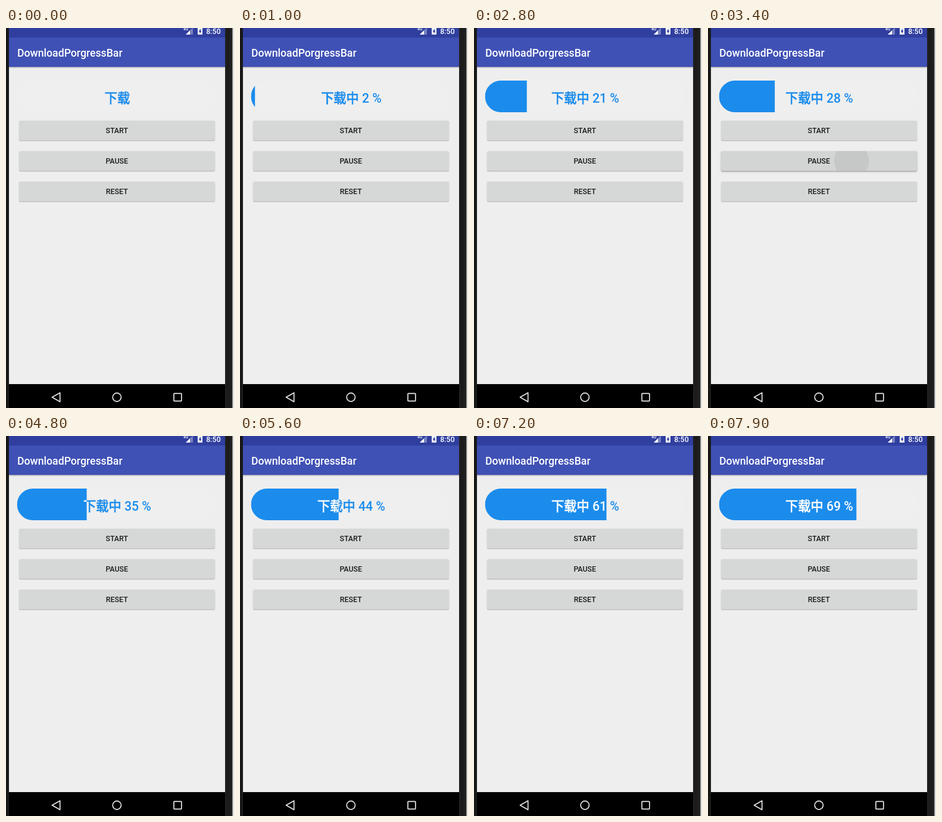
Recreate the animation shown at these times as an HTML page. Size 383 px wide and 636 px high, loop 8000 ms.

```html
<!DOCTYPE html>
<html lang="zh">
<head>
<meta charset="utf-8">
<style>
  html, body { margin: 0; width: 100%; height: 100%; overflow: hidden; background: #1c1c1c; }
  #stage { position: relative; width: 383px; height: 636px; overflow: hidden;
           font: 500 12.4px Roboto, "Noto Sans CJK SC", "Noto Sans CJK", sans-serif; }
  #stage > * { position: absolute; }
  .bezel { inset: 0; background: linear-gradient(90deg, #171717 0 3px, #222 5px, #222 368px, #1a1a1a 372px, #202020 379px, #303030 380px, #888 380px 381px, #ddd 381px); }
  .screen { left: 5px; top: 0; width: 363px; height: 636px; background: #eee; }
  .toolbar { left: 5px; top: 0; width: 363px; height: 65px; box-sizing: border-box;
             border-top: 16px solid #303f9f; background: #3f51b5; box-shadow: 0 1px 2px rgba(0,0,0,.4);
             clip-path: inset(0 0 -5px 0); }
  .nav { left: 5px; top: 596px; width: 363px; height: 40px; background: #000; }
  .button { left: 22px; width: 328.5px; height: 32.5px; border-radius: 2px; background: #d6d7d7;
            box-shadow: 0 1px 1.5px rgba(0,0,0,.27); color: #1c1c1c; text-align: center; line-height: 33px; }
  .button.pressed { box-shadow: 0 1.5px 2.5px rgba(0,0,0,.34); }
  .tint { position: absolute; inset: 0; overflow: hidden; border-radius: 2px; background: rgba(0,0,0,.012); opacity: 0; }
  .ripple { position: absolute; left: 219px; top: 16.5px; border-radius: 50%; background: rgba(0,0,0,.06);
            transform: translate(-50%, -50%); }
  .label { font-size: 21.2px; text-anchor: middle; }
  .label .han { font-weight: 400; stroke: currentColor; stroke-width: .8px; }
  .blue { fill: #1b8cec; color: #1b8cec; }
  .white { fill: #fff; color: #fff; }
</style>
</head>
<body>
<div id="stage">
  <div class="bezel"></div>
  <div class="screen"></div>
  <div class="toolbar"></div>
  <div class="nav"></div>
  <div class="button" style="top:155px">START<div class="tint"><div class="ripple"></div></div></div>
  <div class="button" style="top:206px">PAUSE<div class="tint"><div class="ripple"></div></div></div>
  <div class="button" style="top:257px">RESET</div>
  <svg width="383" height="636">
    <defs>
      <clipPath id="done"><rect id="extent" x="18.5" y="88" width="0" height="53"/></clipPath>
    </defs>
    <!-- status bar and title -->
    <g fill="#fff">
      <text x="298" y="4" font-size="6.5">4G</text>
      <path d="M302 11H314V-1Z" opacity=".35"/>
      <path d="M302 11H309V4Z"/>
      <path d="M324 -1H328V0H330V11H322V0H324Z"/>
      <path d="M327 1L323.4 6.2H325.5V9.8L328.7 4.7H327Z" fill="#303f9f"/>
      <text x="336.3" y="10">8:50</text>
      <text x="19" y="47.6" font-size="17.66">DownloadPorgressBar</text>
    </g>
    <!-- progress -->
    <rect x="18.5" y="88" width="334.5" height="53" rx="26.5" fill="#efefef"/>
    <text class="label blue" x="187" y="124.7"><tspan class="han"></tspan><tspan class="count"></tspan></text>
    <g clip-path="url(#done)">
      <rect class="blue" x="18.5" y="88" width="334.5" height="53" rx="26.5"/>
      <text class="label white" x="187" y="124.7"><tspan class="han"></tspan><tspan class="count"></tspan></text>
    </g>
    <!-- navigation -->
    <g fill="none" stroke="#e8e8e8" stroke-width="1.7" stroke-linejoin="round">
      <path d="M77.5 618L90.7 610.4V625.6Z"/>
      <circle cx="186.3" cy="618" r="7.1"/>
      <rect x="282" y="611.6" width="12.8" height="12.8" rx=".8"/>
    </g>
  </svg>
</div>
<script>
const LOOP = 8000, RATE = 0.0108; // percent per ms
const STARTED = 769.5, PAUSED = 3370, RESUMED = 4062, HELD = 28;
const all = selector => [...document.querySelectorAll(selector)];
const [startButton, pauseButton] = all('.button');
const extent = document.getElementById('extent');
const hans = all('.han'), counts = all('.count');

function percentAt(t) {
  if (t < PAUSED) return Math.floor(RATE * (t - STARTED));
  if (t < RESUMED) return HELD;
  return HELD + Math.floor(RATE * (t - RESUMED));
}

// age is measured from the click; the touch begins 60 ms earlier
function showPress(button, age) {
  const tint = button.querySelector('.tint');
  const active = age >= -60 && age < 230;
  button.classList.toggle('pressed', age >= -60 && age < 110);
  tint.style.opacity = active ? Math.min(1, (230 - age) / 200) : 0;
  const size = active ? 58 * (age + 60) / 90 : 0;
  const ripple = tint.firstElementChild;
  ripple.style.width = ripple.style.height = size + 'px';
}

function render(t) {
  const running = t >= STARTED;
  const percent = running ? percentAt(t) : 0;
  for (const han of hans) han.textContent = running ? '下载中' : '下载';
  for (const count of counts) count.textContent = running ? `\u00a0${percent}\u00a0%` : '';
  extent.setAttribute('width', 3.345 * percent);
  showPress(startButton, t - (t < PAUSED ? STARTED : RESUMED));
  showPress(pauseButton, t - PAUSED);
}

const origin = performance.now();
function tick() {
  render((performance.now() - origin) % LOOP);
  requestAnimationFrame(tick);
}
tick();
</script>
</body>
</html>
```
